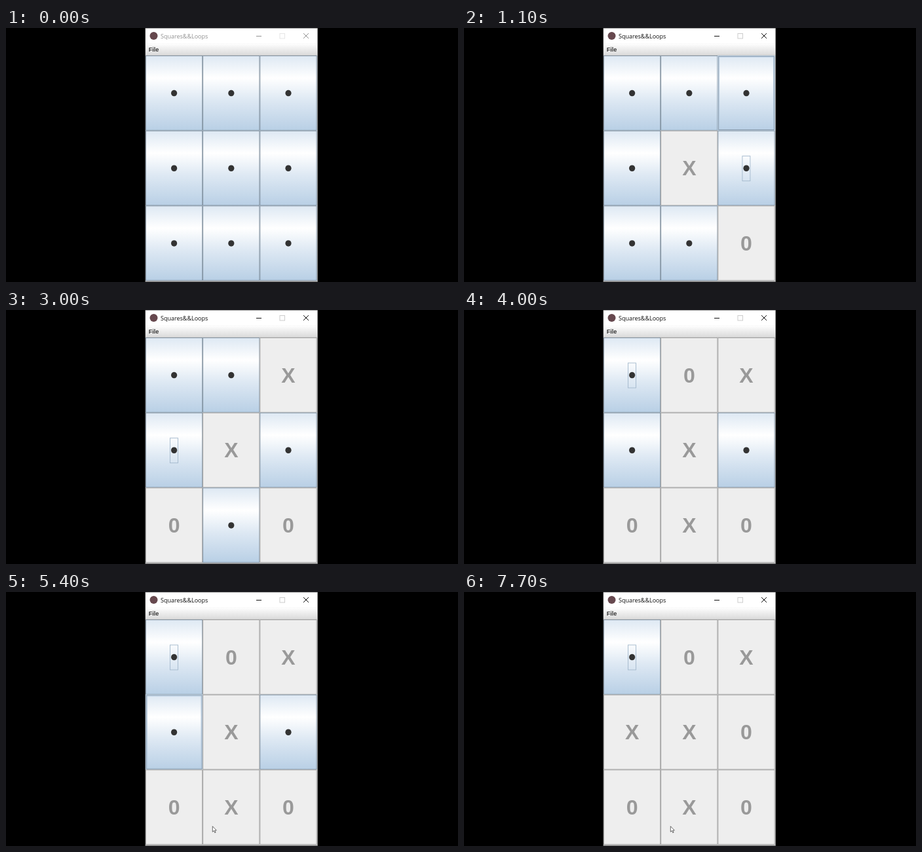
An HTML page with a canvas for the animation above (8 s loop, 690 px wide and 388 px high).

```html
<!DOCTYPE html>
<html lang="en">
<head>
<meta charset="utf-8">
<title>Squares&amp;&amp;Loops</title>
<style>
  html, body { margin: 0; width: 100%; height: 100%; overflow: hidden; background: #000; }
  canvas { display: block; }
</style>
</head>
<body>
<canvas id="stage" width="690" height="388"></canvas>
<script>
const ctx = document.getElementById('stage').getContext('2d');
const LOOP = 8000;
const LEFT = 213, TOP = 42, CELL_W = 87.2, CELL_H = 114.7;

// Each step holds until the next; focus and hover are cell indices.
const steps = [
  { at: 0,    board: '.........' },
  { at: 1100, board: '....X...0', focus: 5, hover: 2 },
  { at: 2000, board: '..X.X.0.0', focus: 3 },
  { at: 2600, board: '..X.X.0.0', focus: 3, hover: 7 },
  { at: 3000, board: '..X.X.0.0', focus: 3 },
  { at: 3100, board: '.0X.X.0X0', focus: 0 },
  { at: 5400, board: '.0X.X.0X0', focus: 0, hover: 3 },
  { at: 7700, board: '.0XXX00X0', focus: 0 },
];
const CURSOR_AT = 4400;

function rect(x, y, w, h, color) {
  ctx.fillStyle = color;
  ctx.fillRect(x, y, w, h);
}

function outline(x, y, w, h, color, width = 0.9) {
  ctx.strokeStyle = color;
  ctx.lineWidth = width;
  ctx.strokeRect(x, y, w, h);
}

function line(color, ...segments) {
  ctx.strokeStyle = color;
  ctx.lineWidth = 1;
  ctx.beginPath();
  for (const [x1, y1, x2, y2] of segments) {
    ctx.moveTo(x1, y1);
    ctx.lineTo(x2, y2);
  }
  ctx.stroke();
}

function text(string, x, y, font, color, align = 'left') {
  ctx.font = font;
  ctx.fillStyle = color;
  ctx.textAlign = align;
  ctx.fillText(string, x, y);
}

function shade(y, h, ...stops) {
  const gradient = ctx.createLinearGradient(0, y, 0, y + h);
  for (const [offset, color] of stops) gradient.addColorStop(offset, color);
  return gradient;
}

function drawWindow(active) {
  rect(0, 0, 690, 388, '#000');
  rect(212.4, 0, 263.6, 388, '#6b6b6b');
  rect(213, 0.8, 262.2, 386, '#eee');
  rect(213, 0.8, 262.2, 22.7, '#fff');
  rect(213, 23.5, 262.2, 18, shade(23.5, 18, [0, '#fff'], [1, '#dadada']));
  rect(213, 41, 262.2, 1, '#ccc');

  ctx.fillStyle = '#66484e';
  ctx.beginPath();
  ctx.arc(225.5, 12, 6, 0, Math.PI * 2);
  ctx.fill();

  const ink = active ? '#111' : '#929292';
  text('Squares&&Loops', 236, 15.7, '9px "Open Sans", sans-serif', ink);
  text('File', 217.7, 36, 'bold 9px "Liberation Sans", Arial, sans-serif', '#333');
  line(ink, [382, 12.5, 390, 12.5]);
  outline(418, 8.5, 7.5, 7.5, active ? '#ccc' : '#e6e6e6', 1);
  line(ink, [454, 8, 462, 16], [462, 8, 454, 16]);
}

function drawCell(index, mark, focused, hovered) {
  const x = LEFT + (index % 3) * CELL_W;
  const y = TOP + Math.floor(index / 3) * CELL_H;
  const cx = x + CELL_W / 2, cy = y + CELL_H / 2;
  const frame = (inset, color) =>
    outline(x + inset, y + inset, CELL_W - 2 * inset, CELL_H - 2 * inset, color);

  if (mark !== '.') {
    rect(x, y, CELL_W, CELL_H, '#eee');
    frame(0.45, '#999');
    text(mark, cx, cy + 11.4, 'bold 32px "Liberation Sans", Arial, sans-serif', '#999', 'center');
    return;
  }

  rect(x, y, CELL_W, CELL_H, shade(y, CELL_H,
    [0, '#dde8f3'], [0.3, '#fff'], [0.6, '#dde8f3'], [1, '#b8cfe5']));
  if (hovered) {
    frame(0.45, '#b8cfe5');
    frame(1.35, '#7a8a99');
    frame(2.25, '#b8cfe5');
  } else {
    frame(0.45, '#7a8a99');
  }
  ctx.fillStyle = '#333';
  ctx.beginPath();
  ctx.ellipse(cx, cy + 0.2, 4.6, 4.8, 0, 0, Math.PI * 2);
  ctx.fill();
  if (focused) outline(cx - 6.1, cy - 18.4, 12, 38, '#a3b8cc');
}

function drawCursor(x, y) {
  const arrow = new Path2D('M0 0V8.6L2 6.8L3.5 10L4.8 9.4L3.4 6.3H6Z');
  ctx.save();
  ctx.translate(x, y);
  ctx.fillStyle = '#fff';
  ctx.fill(arrow);
  ctx.strokeStyle = '#444';
  ctx.lineWidth = 0.8;
  ctx.stroke(arrow);
  ctx.restore();
}

function draw() {
  const time = performance.now() % LOOP;
  const { at, board, focus, hover } = steps.findLast(step => step.at <= time);
  drawWindow(at > 0);
  [...board].forEach((mark, i) => drawCell(i, mark, i === focus, i === hover));
  if (time >= CURSOR_AT) drawCursor(315.3, 357.8);
  requestAnimationFrame(draw);
}
draw();
</script>
</body>
</html>
```
